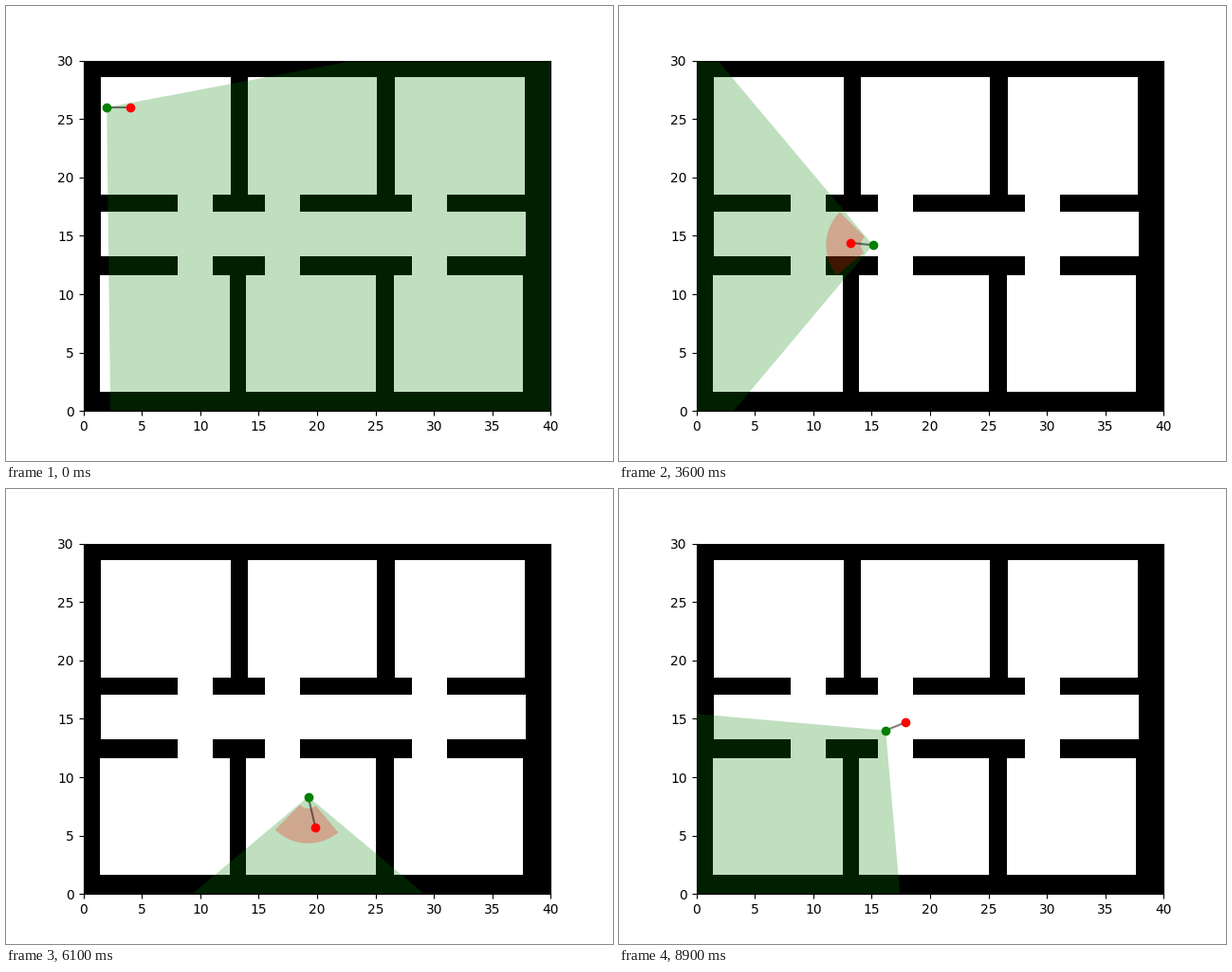
Recreate the animation shown at these times as a matplotlib script. Size 640 by 480 pixels, loop 9 s.

```python
import numpy as np
import matplotlib.pyplot as plt
from matplotlib.animation import FuncAnimation
from matplotlib.patches import Rectangle, Wedge

FRAMES = 90
FOV = 100
NEAR, FAR, TOO_CLOSE = 4, 5, 1

# End of each leg: frame, guide x, y, follower x, y, viewing direction
LEGS = np.array([
    (0, 2, 26, 4, 26, -39.3),
    (17, 9.22, 18.35, 7.8, 19.15, 135),
    (26, 9.7, 14.2, 9.6, 16, 90),
    (36, 15.1, 14.2, 13.17, 14.4, 180),
    (44, 16.44, 9.35, 16.44, 10.4, 126.9),
    (51, 18.37, 5.45, 17.5, 5, 126.9),
    (64, 19.5, 9.2, 21, 6, -90),
    (72, 17.75, 12.82, 20.98, 9.6, -63.4),
    (80, 17.4, 15.2, 18.6, 12.3, 225),
    (89, 16.2, 14, 17.9, 14.7, 225)])


def pose(frame):
    """Guide, follower and viewing direction; the follower sets off late."""
    i = np.searchsorted(LEGS[:, 0], frame)
    a, b = LEGS[max(i - 1, 0)], LEGS[i]
    u = (frame - a[0]) / (b[0] - a[0]) if i else 0
    guide = a[1:3] + (b - a)[1:3] * u
    follower = a[3:5] + (b - a)[3:5] * u ** 1.5
    return guide, follower, b[5]


fig, ax = plt.subplots(figsize=(6.4, 4.8), dpi=100)
ax.set_xlim(0, 40)
ax.set_ylim(0, 30)
ax.set_aspect("equal")
ax.set_facecolor("black")

SCALE, LEFT, BOTTOM = 12.32, 81.6, 427.2


def room(x, y, width, height):
    """Open floor, measured in pixels from the top left."""
    ax.add_patch(Rectangle(
        ((x - LEFT) / SCALE, (BOTTOM - y - height) / SCALE),
        width / SCALE, height / SCALE,
        fc="white", lw=0, antialiased=False, zorder=0.5))


room(100, 217, 448, 47)
for upper, lower, door in zip((100, 254.6, 410), (99, 253, 408.6),
                              (181, 273, 428)):
    room(upper, 75, 136.6, 124)
    room(lower, 284, 136.6, 123)
    room(door, 199, 37, 85)


def sector(radius, color, width=None):
    return ax.add_patch(Wedge((0, 0), radius, 0, 90, width=width,
                              fc=color, lw=0, alpha=0.25))


view = sector(80, "green")
far = sector(FAR, "red")
near = sector(NEAR, "red", NEAR - TOO_CLOSE)
link, = ax.plot([], [], color="black", alpha=0.5)
guide_dot, = ax.plot([], [], "o", color="green")
follower_dot, = ax.plot([], [], "o", color="red")


def aim(wedge, center, start, end):
    wedge.set_center(tuple(center))
    wedge.set_theta1(start)
    wedge.set_theta2(end)


def update(frame):
    guide, follower, heading = pose(frame)
    start = (heading - FOV / 2) % 360
    aim(view, guide, start, start + FOV)
    aim(far, guide, start, start + 95)
    aim(near, guide, start + 5, start + 90)

    dx, dy = follower - guide
    distance = np.hypot(dx, dy)
    bearing = np.degrees(np.arctan2(dy, dx)) % 360 - start
    close = distance < TOO_CLOSE
    in_near = distance <= NEAR and 5 <= bearing <= 90
    in_far = distance <= FAR and 0 <= bearing <= 95
    near.set_visible(close or in_near)
    far.set_visible(close or (in_far and not in_near))
    for zone in (near, far):
        zone.set_facecolor("blue" if close else "red")

    link.set_data(*zip(guide, follower))
    guide_dot.set_data(guide[:1], guide[1:])
    follower_dot.set_data(follower[:1], follower[1:])
    return view, far, near, link, guide_dot, follower_dot


anim = FuncAnimation(fig, update, frames=FRAMES, interval=100,
                     init_func=lambda: update(0), repeat=True, repeat_delay=0)
plt.show()
```
